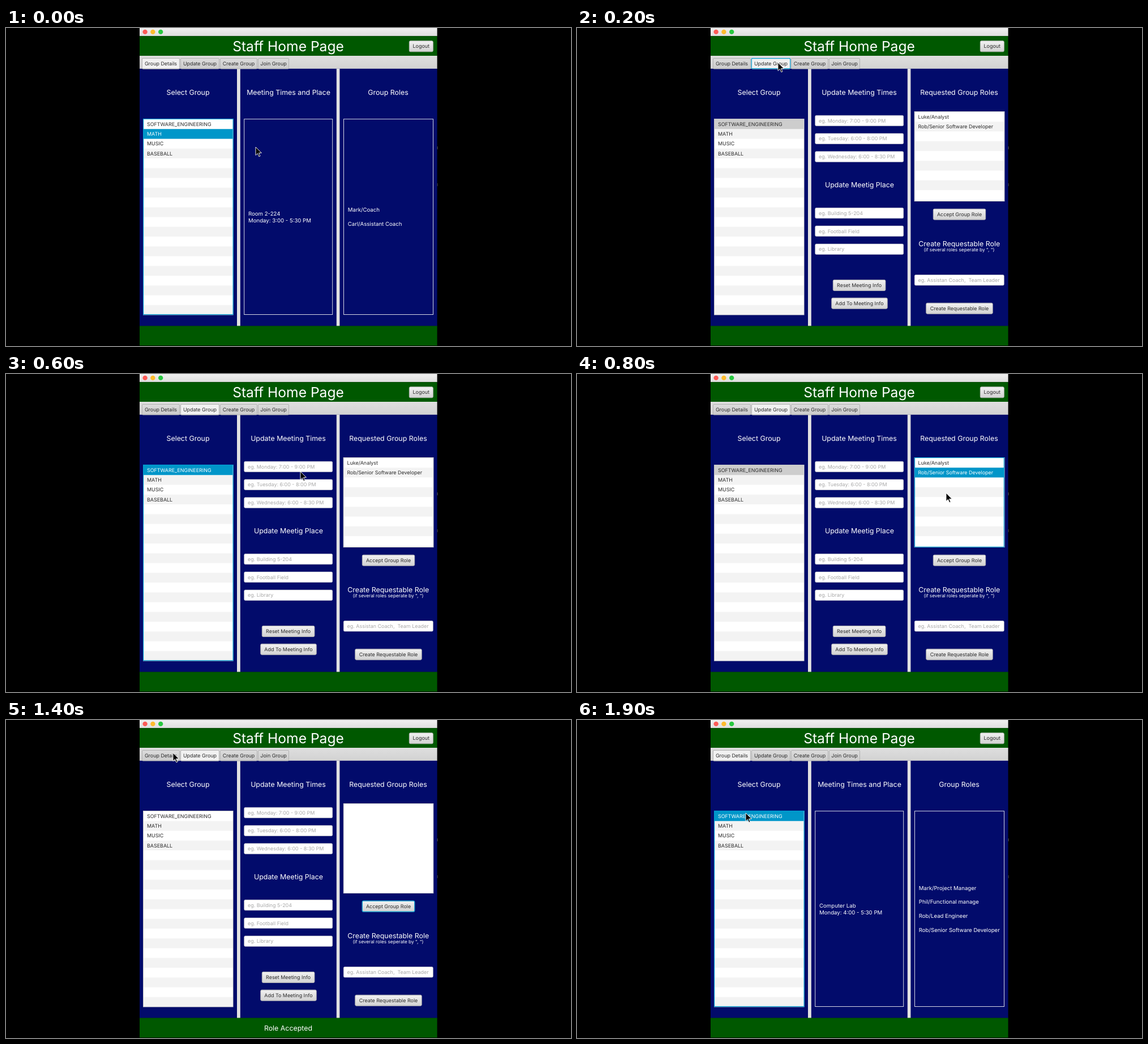
Recreate the animation shown at these times as an HTML page. Size 998 by 561 pixels, loop 2000 ms.

```html
<!DOCTYPE html>
<html lang="en">
<head>
<meta charset="utf-8">
<title>Staff Home Page</title>
<style>
html, body { margin: 0; width: 100%; height: 100%; overflow: hidden; background: #000; }
svg { display: block; width: 998px; height: 561px; }
text { font: 8.94px Inter, "Open Sans", sans-serif; font-optical-sizing: none; text-rendering: geometricPrecision; fill: #2b2b2b; white-space: pre; }
.title { font-size: 24.6px; fill: #fff; }
.head { font-size: 12.4px; fill: #fff; }
.info { font-size: 9.63px; fill: #fff; }
.note { font-size: 8.26px; fill: #fff; }
.hint { fill: #a9a9a9; }
.light { fill: #fff; }
.mid { text-anchor: middle; }
.focus { fill: none; stroke: #039ed3; stroke-width: 1.2; }
.frame { fill: none; stroke: #d8d8e4; }

.layer, #cursor { animation: 2s step-end infinite; }
@keyframes details { 0%, 75% { opacity: 1 } 10% { opacity: 0 } }
@keyframes update { 0%, 75% { opacity: 0 } 10% { opacity: 1 } }
@keyframes math-row { 0% { opacity: 1 } 10% { opacity: 0 } }
@keyframes math-info { 0% { opacity: 1 } 85% { opacity: 0 } }
@keyframes software-info { 0% { opacity: 0 } 85% { opacity: 1 } }
@keyframes group-focus { 0%, 25%, 85% { opacity: 1 } 10%, 35% { opacity: 0 } }
@keyframes software-idle { 0%, 25%, 50% { opacity: 0 } 10%, 35% { opacity: 1 } }
@keyframes software-row { 0%, 35% { opacity: 0 } 25%, 85% { opacity: 1 } }
@keyframes update-tab { 0%, 25% { opacity: 0 } 10% { opacity: 1 } }
@keyframes details-tab { 0%, 85% { opacity: 0 } 75% { opacity: 1 } }
@keyframes requests { 0% { opacity: 1 } 50% { opacity: 0 } }
@keyframes request-row { 0%, 50% { opacity: 0 } 35% { opacity: 1 } }
@keyframes accept-focus { 0%, 75% { opacity: 0 } 50% { opacity: 1 } }
@keyframes message { 0%, 85% { opacity: 0 } 50% { opacity: 1 } }

#cursor { animation-name: pointer; }
@keyframes pointer {
  0% { transform: translate(441px, 210px) }
  5% { transform: translate(400px, 130px) }
  10% { transform: translate(355px, 61px) }
  15% { transform: translate(343px, 120px) }
  20% { transform: translate(330px, 173px) }
  30% { transform: translate(520px, 172px) }
  35% { transform: translate(660px, 172px) }
  40% { transform: translate(652px, 210px) }
  45% { transform: translate(668px, 325px) }
  60% { transform: translate(560px, 235px) }
  65% { transform: translate(400px, 110px) }
  70% { transform: translate(295px, 58px) }
  75% { transform: translate(293px, 138px) }
  80% { transform: translate(298px, 164px) }
}
</style>
</head>
<body>
<svg viewBox="0 0 998 561" xmlns="http://www.w3.org/2000/svg">
  <defs>
    <linearGradient id="bar" x2="0" y2="1"><stop stop-color="#f0f0f0"/><stop offset="1" stop-color="#dedede"/></linearGradient>
    <linearGradient id="strip" x2="0" y2="1"><stop stop-color="#dedede"/><stop offset="1" stop-color="#d2d2d2"/></linearGradient>
    <linearGradient id="button" x2="0" y2="1"><stop stop-color="#f2f2f2"/><stop offset="1" stop-color="#d2d2d2"/></linearGradient>
    <linearGradient id="tab" x2="0" y2="1"><stop stop-color="#dcdcdc"/><stop offset="1" stop-color="#cbcbcb"/></linearGradient>
    <pattern id="rows" width="20" height="34.5" patternUnits="userSpaceOnUse">
      <path fill="#fff" d="M0 0h20v17.25H0z"/><path fill="#f3f3f3" d="M0 17.25h20v17.25H0z"/>
    </pattern>
  </defs>
  <g id="window"></g>
  <path id="cursor" d="M0 0V14.5L3.4 11.3 5.8 16.8 8 15.9 5.6 10.4H10.3Z" fill="#000" stroke="#fff" stroke-width=".9"/>
</svg>
<script>
const ROW = 17.25;
const rect = (x, y, w, h, fill, extra = '') =>
  `<rect x="${x}" y="${y}" width="${w}" height="${h}" fill="${fill}" ${extra}/>`;
const outline = (x, y, w, h, name, rx = 0) =>
  `<rect class="${name}" x="${x}" y="${y}" width="${w}" height="${h}" rx="${rx}"/>`;
const text = (x, y, value, name = '') => `<text x="${x}" y="${y}" class="${name}">${value}</text>`;
const layer = (name, ...parts) => `<g class="layer" style="animation-name:${name}">${parts.join('')}</g>`;
const head = (x, y, value) => text(x, y, value, 'head mid');
const lines = (x, y, step, values) => values.map((v, i) => text(x, y + i * step, v, 'info')).join('');

const button = (x, y, w, label) =>
  rect(x, y, w, 19, 'url(#button)', 'rx="2" stroke="#b4b4b4"') + text(x + w / 2, y + 12.6, label, 'mid');
const field = (x, y, w, hint) =>
  rect(x, y, w, 18.5, '#fff', 'rx="2" stroke="#c4c4c8" stroke-width=".6"') + text(x + 6.3, y + 12.4, hint, 'hint');

const listBox = (x, y, h, fill) =>
  rect(x - .5, y - .5, 158.5, h + 1, '#fff', 'stroke="#c6c6c6"') +
  `<g transform="translate(${x} ${y})">${rect(0, 0, 157.5, h, fill)}</g>`;
const item = (x, y, i, label, name) => text(x + 6, y + i * ROW + 11.8, label, name);
const selected = (x, y, i, label, fill, name) => rect(x, y + i * ROW, 157.5, ROW, fill) + item(x, y, i, label, name);

const groups = ['SOFTWARE_ENGINEERING', 'MATH', 'MUSIC', 'BASEBALL'];
const requests = ['Luke/Analyst', 'Rob/Senior Software Developer'];
const tabs = [[240, 67, 'Group Details'], [308, 69, 'Update Group'], [378, 66, 'Create Group'], [445, 55, 'Join Group']];
const BLUE = '#0096c9', GREEN = '#005800', NAVY = '#020b6b';

const tabShape = (i, fill) => rect(tabs[i][0] + .5, 53.5, tabs[i][1] - 1, 18.5, fill, 'rx="1.5" stroke="#b2b2b2"');
const tabFocus = i => outline(tabs[i][0] + .3, 53.7, tabs[i][1] - .6, 18, 'focus', 1.5);

const chrome = [
  rect(236, 0, 525.6, 14.3, 'url(#bar)'),
  ...['#fc5b57', '#fdbc2e', '#28c840'].map((c, i) => `<circle cx="${245.6 + i * 13.8}" cy="6.9" r="4.2" fill="${c}"/>`),
  rect(236, 14.3, 525.6, 35, GREEN),
  rect(236, 49, 525.6, 23, 'url(#strip)'),
  rect(236, 71.8, 525.6, 454, NAVY),
  rect(408, 71.8, 5.8, 454, '#e2e2e2'),
  rect(583.8, 71.8, 5.6, 454, '#e2e2e2'),
  rect(236, 525.6, 525.6, 34.6, GREEN),
  rect(761.6, 209, 1, 5, '#555'), rect(761.6, 274, 1, 5, '#444'),
  text(498.5, 41, 'Staff Home Page', 'title mid'),
  button(712.3, 22.8, 42, 'Logout'),
  ...tabs.map((_, i) => tabShape(i, 'url(#tab)')),
  layer('details', tabShape(0, '#f1f1f1')),
  layer('update', tabShape(1, '#f1f1f1')),
  layer('details-tab', tabFocus(0)),
  layer('update-tab', tabFocus(1)),
  ...tabs.map(([x, w, label]) => text(x + w / 2, 66.3, label, 'mid')),
  layer('message', head(498.5, 548, 'Role Accepted')),
];

const groupList = [
  head(321.5, 117.6, 'Select Group'),
  listBox(243, 161, 344.5, 'url(#rows)'),
  ...groups.map((g, i) => item(243, 161, i, g)),
  layer('math-row', selected(243, 161, 1, groups[1], BLUE, 'light')),
  layer('software-idle', selected(243, 161, 0, groups[0], '#cdcdcd')),
  layer('software-row', selected(243, 161, 0, groups[0], BLUE, 'light')),
  layer('group-focus', outline(242.6, 160.5, 158.5, 345, 'focus')),
];

const detailsPanel = layer('details',
  head(499, 117.6, 'Meeting Times and Place'),
  head(675, 117.6, 'Group Roles'),
  outline(420.7, 160.7, 156, 344.8, 'frame'),
  outline(596.5, 160.7, 158, 344.8, 'frame'),
  layer('math-info',
    lines(428, 330.5, 12.4, ['Room 2-224', 'Monday: 3:00 - 5:30 PM']),
    lines(603.8, 324.4, 24.8, ['Mark/Coach', 'Carl/Assistant Coach'])),
  layer('software-info',
    lines(428, 330.5, 12.4, ['Computer Lab', 'Monday: 4:00 - 5:30 PM']),
    lines(603.8, 299.6, 24.8, ['Mark/Project Manager', 'Phil/Functional manage', 'Rob/Lead Engineer', requests[1]])));

const times = ['Monday: 7:00 - 9:00 PM', 'Tuesday: 6:00 - 8:00 PM', 'Wednesday: 6:00 - 8:30 PM'];
const places = ['Building 5-204', 'Football Field', 'Library'];
const fields = (y, hints) => hints.map((h, i) => field(420.7, y + i * 31.8, 156, 'eg. ' + h)).join('');

const updatePanel = layer('update',
  head(498.5, 117.6, 'Update Meeting Times'),
  fields(154.2, times),
  head(499, 281.3, 'Update Meetig Place'),
  fields(317.3, places),
  button(452.3, 444.4, 92.6, 'Reset Meeting Info'),
  button(449.8, 476.2, 98.4, 'Add To Meeting Info'),
  head(675, 117.6, 'Requested Group Roles'),
  listBox(596.8, 148, 157, '#fff'),
  layer('requests',
    listBox(596.8, 148, 157, 'url(#rows)'),
    ...requests.map((r, i) => item(596.5, 148, i, r))),
  layer('request-row',
    selected(596.5, 148, 1, requests[1], BLUE, 'light'),
    outline(596.5, 147.6, 157.8, 157.6, 'focus')),
  button(629.3, 319.2, 92.4, 'Accept Group Role'),
  layer('accept-focus', outline(629.3, 319.2, 92.4, 19, 'focus', 2)),
  head(675.3, 385, 'Create Requestable Role'),
  text(675, 394, '(if several roles seperate by ", ")', 'note mid'),
  field(596.3, 435.5, 158, 'eg. Assistan Coach,  Team Leader'),
  button(616.8, 485.2, 117.4, 'Create Requestable Role'));

document.getElementById('window').innerHTML =
  [...chrome, ...groupList, detailsPanel, updatePanel].join('');
</script>
</body>
</html>
```
